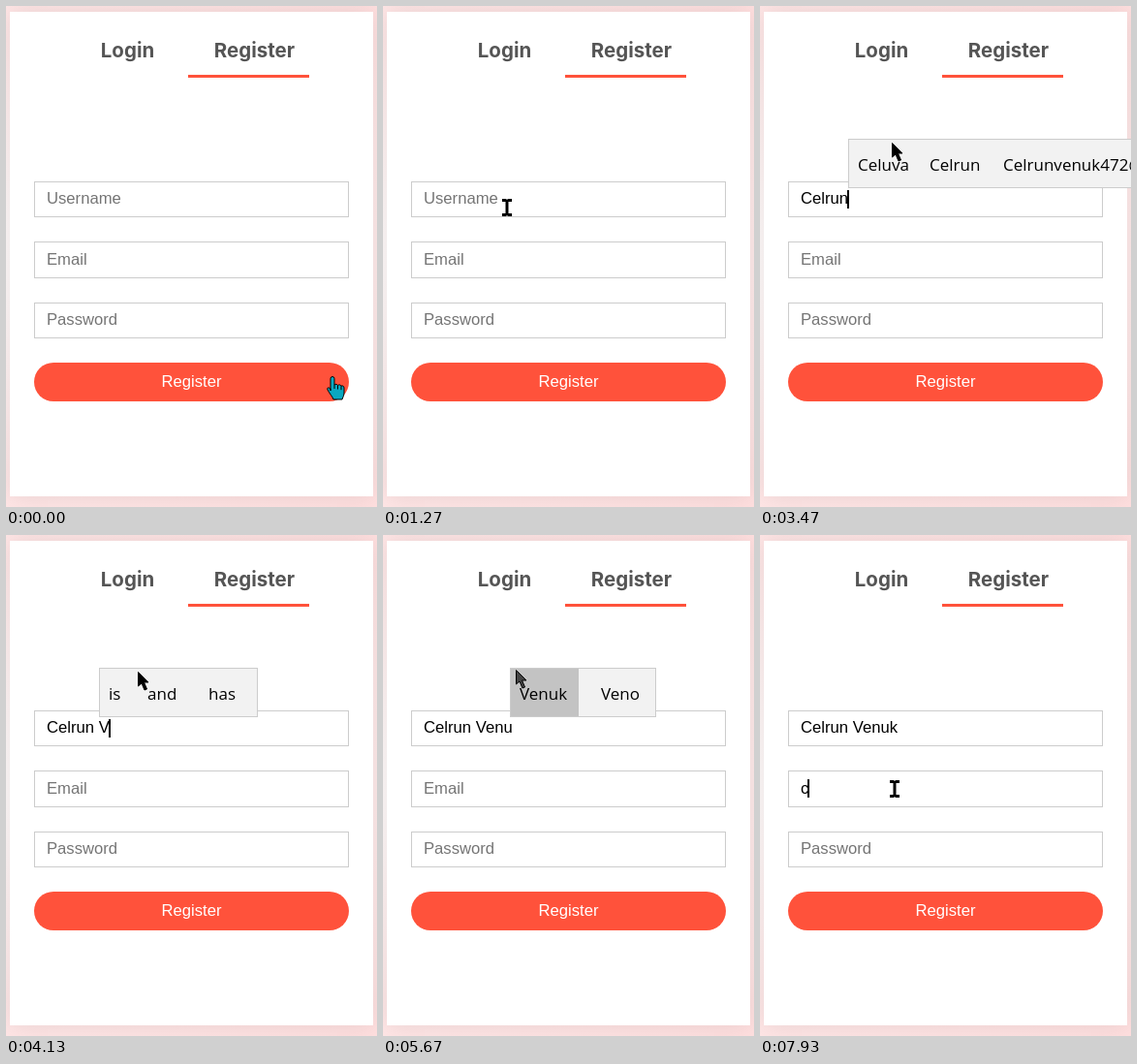
An HTML page for the animation above (8 s loop, 383 by 517 pixels).

```html
<!DOCTYPE html>
<html lang="en">
<head>
<meta charset="utf-8">
<title>Register form</title>
<style>
html, body { margin: 0; width: 100%; height: 100%; overflow: hidden; }
body { background: radial-gradient(1089px 424px at -150px 257px, #fff, #ffd6d6); }
.card { position: absolute; left: 4px; top: 6px; width: 375px; height: 500px;
  background: #fff; box-shadow: 0 0 25px rgba(0, 0, 0, .1); }
svg { position: absolute; left: 0; top: 0; }
text { white-space: pre; font: 16.667px "Liberation Sans", Arial, sans-serif; }
.tab { font: 700 20.5px Inter, sans-serif; fill: #555; text-anchor: middle; }
.pop text { font: 17px "Open Sans", sans-serif; }
.hint { fill: #757575; }
.box { fill: #fff; stroke: #ccc; }
</style>
</head>
<body>
<div class="card"></div>
<svg width="383" height="517">
  <text class="tab" x="125.5" y="53">Login</text>
  <text class="tab" x="256.5" y="53">Register</text>
  <path fill="#ff523b" d="M188 71h125v3h-125z"/>
  <rect class="box" x="29.5" y="181.5" width="324" height="36"/>
  <rect class="box" x="29.5" y="243.5" width="324" height="37"/>
  <rect class="box" x="29.5" y="306.5" width="324" height="36"/>
  <text id="name" x="42" y="204"></text>
  <text id="email" x="42" y="267"></text>
  <text class="hint" x="42" y="329">Password</text>
  <rect x="29" y="368" width="325" height="40" rx="20" fill="#ff523b"/>
  <text x="191.5" y="393" fill="#fff" text-anchor="middle">Register</text>
  <rect id="caret" width="2" height="19"/>
  <g id="pop" class="pop"></g>
  <g id="cursor"></g>
</svg>
<script>
const $ = id => document.getElementById(id);
const LOOP = 8000, TICK = 200 / 3, BLINK = 528;

// [time, name, email]; email is null until that field has focus
const edits = [
  [1670, '', null], [2670, 'C', null], [2930, 'Ce', null], [3000, 'Cel', null],
  [3130, 'Celr', null], [3270, 'Celru', null], [3470, 'Celrun', null],
  [3670, 'Celrun ', null], [4130, 'Celrun V', null], [4930, 'Celrun Ve', null],
  [5000, 'Celrun Ven', null], [5130, 'Celrun Venu', null], [6000, 'Celrun Venuk', null],
  [7130, 'Celrun Venuk', ''], [7195, 'Celrun Venuk', ''], [7930, 'Celrun Venuk', 'c']
];

// [time, left, right, words with their x, right edge of the hovered cell]
const pops = [
  [0],
  [2870, 53, 232, [['Can', 64], ['Could', 119], ['Call', 191]]],
  [3200, 71, 286, [['Celrun', 82], ['Celuva', 157], ['Cell', 243]]],
  [3470, 91, 400, [['Celuva', 102], ['Celrun', 176], ['Celrunvenuk472@', 252]]],
  [3670],
  [3870, 96, 260, [['is', 107], ['and', 147], ['has', 210]]],
  [4270, 106, 262, [['Venuk', 117], ['I', 187], ['You', 217]]],
  [5000, 106, 262, [['Venuk', 117], ['I', 187], ['You', 217]], 177],
  [5130],
  [5270, 131, 282, [['Venuk', 142], ['Veno', 226]]],
  [5470, 131, 282, [['Venuk', 142], ['Veno', 226]], 202],
  [6200, 141, 287, [["Venuk's", 152], ['Veno', 234]]],
  [7130]
];

// [time, x, y] of the pointer
const path = [
  [0, 337, 383], [533, 261, 45], [1000, 261, 45], [1266, 128, 208], [1533, 124, 197],
  [1800, 124, 197], [1933, 136, 141], [4930, 136, 141], [5000, 137, 139], [6600, 137, 139],
  [6800, 144, 243], [6933, 139, 267], [7133, 139, 262], [LOOP, 139, 262]
];

const shapes = {
  arrow: fill => `<path d="M.5.5v14.5l3.5-3 3 7 2.5-1-3-7h4.5z" fill="${fill}" stroke="#000"/>`,
  beam: () => '<path d="M-5-9h4l1 1 1-1h4v3h-3.5v12h3.5v3h-4l-1-1-1 1h-4v-3h3.5v-12h-3.5z"/>',
  hand: () => `<path fill="#0aa8c0" stroke="#000" stroke-linejoin="round"
    d="M-2 14V1.5a2 2 0 014 0V8c1-1 3-1 3.5.5 1-1 3-.8 3.5.7 1-.7 3-.3 3 1.8v5c0 3-1 4-2 7H1c-1-3-4-6-6-10-1-2 1-3 3-1z
    M2 8v4M5.5 8.5v4M9 9.2v4"/>`
};

const latest = (list, t) => list.filter(e => e[0] <= t).pop();

function pointer(t) {
  const now = Math.floor((t + 4) / TICK) * TICK;
  const i = Math.max(1, path.findIndex(k => k[0] > now));
  const [t0, x0, y0] = path[i - 1], [t1, x1, y1] = path[i];
  const f = (now - t0) / (t1 - t0);
  return [Math.round(x0 + (x1 - x0) * f), Math.round(y0 + (y1 - y0) * f)];
}

function shapeAt(x, y) {
  if (y >= 368 && y < 408 || x >= 188 && x < 313 && y < 74) return 'hand';
  const inField = [181, 243, 306].some(top => y >= top && y < top + 38);
  return inField ? 'beam' : 'arrow';
}

function setField(el, value, hint) {
  el.textContent = value || hint;
  el.setAttribute('class', value ? '' : 'hint');
}

function drawCaret(t, edit) {
  const [start, name, email] = edit;
  const value = email ?? name;
  const width = value ? $(email === null ? 'name' : 'email').getComputedTextLength() : 0;
  $('caret').setAttribute('x', Math.max(42, Math.floor(41.5 + width)));
  $('caret').setAttribute('y', email === null ? 190 : 252);
  return (t - start) % (2 * BLINK) < BLINK;
}

function popup([, left, right, words, hover]) {
  if (!words) return '';
  const cell = hover ? `<path fill="#c3c3c3" d="M${left + 1} 138H${hover}V187H${left + 1}z"/>` : '';
  return `<rect x="${left + .5}" y="137.5" width="${right - left - 1}" height="50" fill="#f2f2f2" stroke="#ccc"/>` +
    cell + words.map(([w, x]) => `<text x="${x - 1}" y="170">${w}</text>`).join('');
}

function draw() {
  const t = performance.now() % LOOP;
  const edit = latest(edits, t), pop = latest(pops, t);
  setField($('name'), edit && edit[1], 'Username');
  setField($('email'), edit && edit[2], 'Email');
  $('caret').style.display = edit && drawCaret(t, edit) ? '' : 'none';
  $('pop').innerHTML = popup(pop);
  const [x, y] = pointer(t);
  $('cursor').setAttribute('transform', `translate(${x} ${y})`);
  $('cursor').innerHTML = shapes[shapeAt(x, y)](pop[4] ? '#444' : '#000');
  requestAnimationFrame(draw);
}
draw();
</script>
</body>
</html>
```
